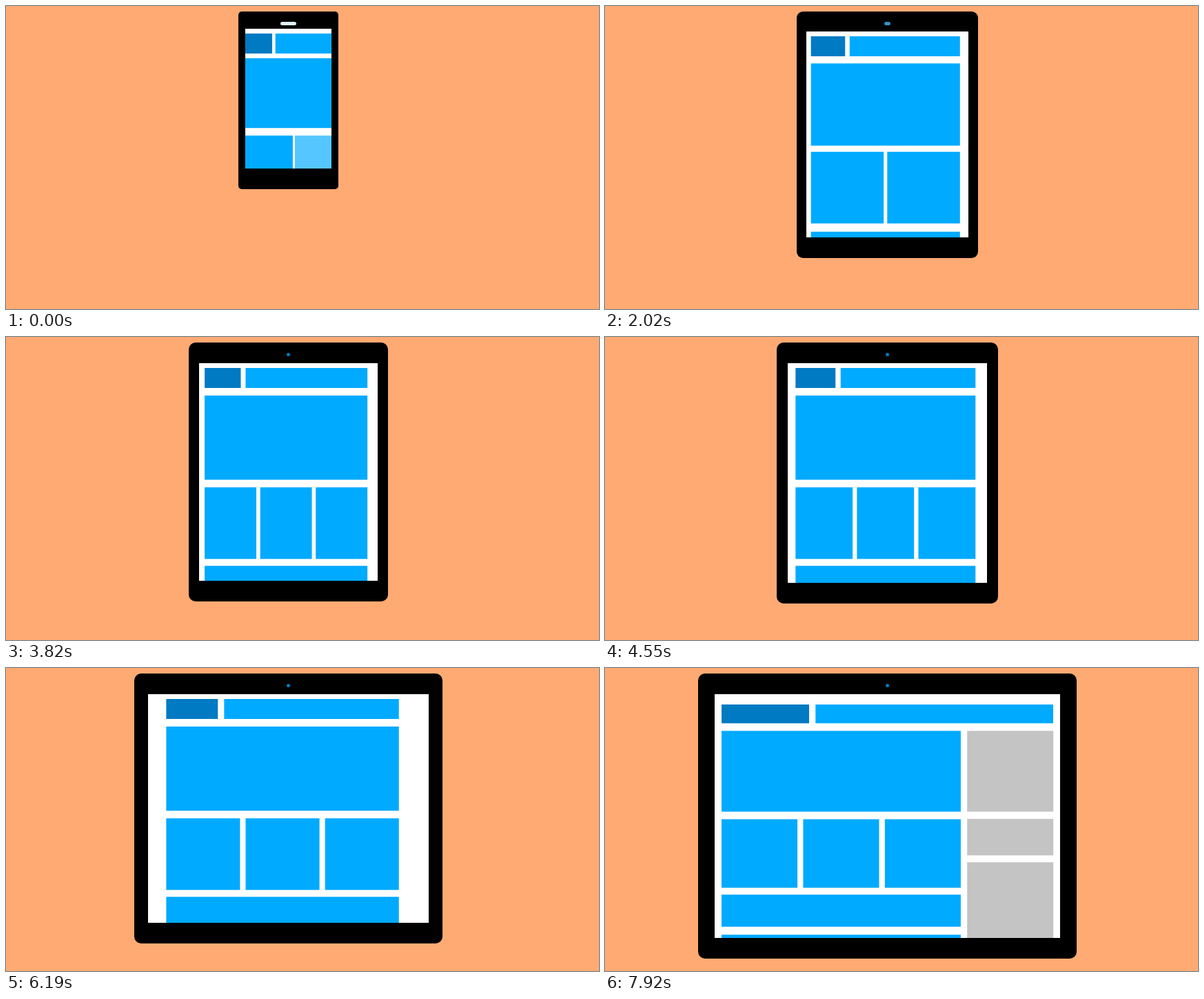
An HTML page with a canvas that plays this animation: 860x440 px, repeating every 8000 ms.

```html
<!DOCTYPE html>
<html lang="en">
<head>
<meta charset="utf-8">
<title>Responsive layout</title>
<style>
  html, body { margin: 0; width: 100%; height: 100%; overflow: hidden; background: #ffaa73; }
  canvas { display: block; }
</style>
</head>
<body>
<canvas id="stage" width="860" height="440"></canvas>
<script>
const ctx = document.getElementById('stage').getContext('2d');
const LOOP = 8000, STEP = 89, CENTER = 409.5, TOP = 8;
const BLUE = '#00aaff', NAVY = '#007ac3', GREY = '#c4c4c4';

const mix = (a, b, p) => a + (b - a) * p;
const ramp = (t, start, end) => Math.min(1, Math.max(0, (t - start) / (end - start)));
const ease = (t, start, end) => {
  const p = ramp(t, start, end);
  return p * p * (3 - 2 * p);
};

// How far the phone has grown into a tablet
const tabletness = t => ease(t, -500, 2800);

function deviceAt(t) {
  const tablet = tabletness(t);
  const half = 68 + 73 * tablet + 137 * ease(t, 3350, 8400);
  const bottom = Math.round(258 + 124 * tablet + 40 * ramp(t, 2700, 7920) ** 2);
  const left = Math.round(CENTER - half), width = 2 * (CENTER - left);
  const inset = Math.round(4.9 + .034 * width);
  const y = Math.round(33 + 4.5 * tablet);
  return { left, width, height: bottom - TOP,
    screen: { x: left + inset, y, w: width - 2 * inset, h: bottom - 30 - y } };
}

function box(x, y, w, h, color = BLUE, alpha = 1) {
  ctx.globalAlpha = alpha;
  ctx.fillStyle = color;
  ctx.fillRect(x, y, w, h);
  ctx.globalAlpha = 1;
}

function pill(x, y, w, h, radius, color) {
  ctx.fillStyle = color;
  ctx.beginPath();
  ctx.roundRect(x, y, w, h, radius);
  ctx.fill();
}

function drawPage(t, screen) {
  const tablet = tabletness(t);
  const wide = ramp(t, 6850, 7920);
  const growth = screen.w - 124;

  // Fluid content column, giving way to the sidebar at the end
  const margin = mix(.06 * growth + 11 * ease(t, 3820, 7000), 10, wide);
  const left = screen.x + margin;
  const content = 124 + .83 * growth - 90 * ramp(t, 5700, 7920);

  // Header
  const headY = screen.y + 7 + 8 * wide, headH = 29 - 1.7 * wide;
  const headW = mix(content, screen.w - 20, wide ** 2);
  const logoW = .222 * content + 12 * (1 - tablet) + 50 * wide ** 2;
  const navX = logoW + 2 + .021 * content;
  box(left, headY, logoW, headH, NAVY);
  box(left + navX, headY, headW - navX, headH);

  // Main block
  const mainY = headY + headH + 6.5 + 4.5 * tablet;
  const mainH = 100 + 22.3 * tablet - 5 * wide;
  box(left, mainY, content, mainH);

  // Row: a second and later a third column join in
  const second = ramp(t, -300, 150), third = ramp(t, 2210, 2910);
  const count = 1 + ramp(t, -530, 150) + third;
  const gap = .024 * content, pitch = (content + gap) / count;
  const lift = 2 * (ramp(t, 0, 150) - ramp(t, 2760, 2910));
  const rowY = mainY + mainH + 11, rowH = 104 - 4.5 * wide;
  const column = (x, y, alpha) => box(x, y, pitch - gap, rowH, BLUE, alpha);
  column(left, rowY - lift, 1);
  column(left + pitch, rowY - lift, second);
  column(left + 2 * pitch + 40 * (1 - third), rowY, third);

  // Full-width rows below
  const footY = rowY + rowH + 10, footH = 48 - 1.4 * wide;
  for (const i of [0, 1]) box(left, footY + i * (footH + 11.6), content, footH);

  // Sidebar
  const shown = ramp(t, 7150, 7750);
  const sideX = left + content + 9.3 + 40 * (1 - shown);
  const panel = (y, h) => box(sideX, y, 125, h, GREY, shown);
  panel(mainY, mainH);
  panel(rowY - .5, 53);
  panel(rowY + 62.5, 150);
}

function draw(t) {
  const { left, width, height, screen } = deviceAt(t);
  box(0, 0, 860, 440, '#ffaa73');
  pill(left, TOP, width, height, Math.min(10, .035 * width), '#000');

  const shrink = ramp(t, 0, 2600), speaker = mix(23, 5, shrink);
  const rgb = [mix(224, 0, shrink), mix(242, 123, shrink), mix(252, 192, shrink)];
  pill(CENTER - speaker / 2, 23, speaker, 5, 2.5, `rgb(${rgb.map(Math.round)})`);

  ctx.save();
  ctx.beginPath();
  ctx.rect(screen.x, screen.y, screen.w, screen.h);
  ctx.clip();
  box(screen.x, screen.y, screen.w, screen.h, '#fff');
  drawPage(t, screen);
  ctx.restore();
}

function tick() {
  // Poses are held for one step each.
  draw(Math.round(performance.now() % LOOP / STEP) * STEP);
  requestAnimationFrame(tick);
}
tick();
</script>
</body>
</html>
```
